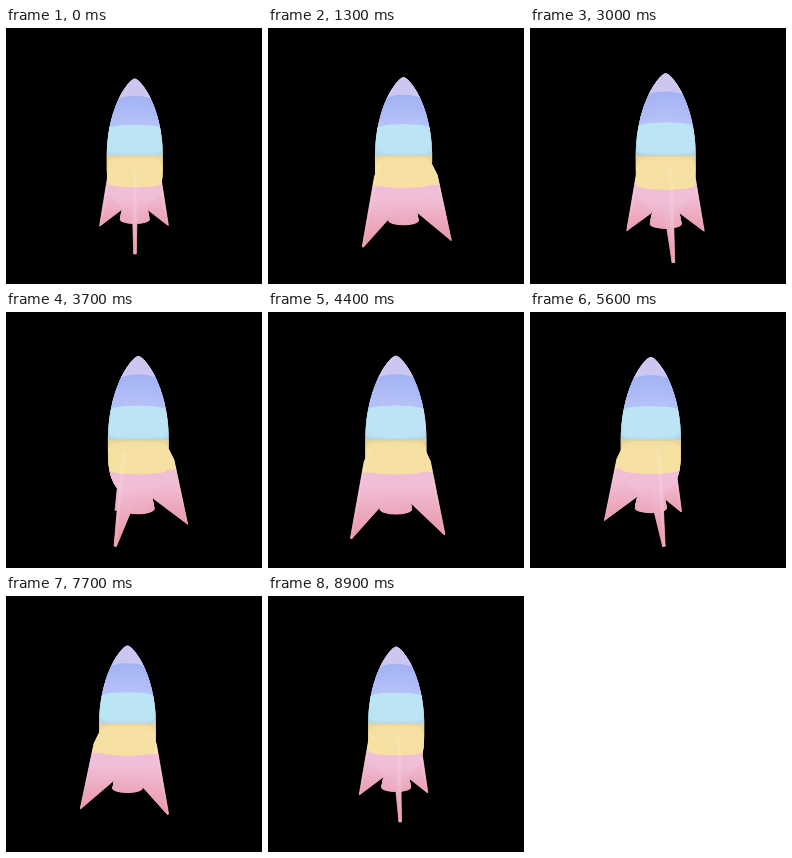
These frames come from a looping animation (256x256 px, 9 s). An HTML page with a canvas:

```html
<!DOCTYPE html>
<html lang="en">
<head>
<meta charset="utf-8">
<title>Pastel rocket</title>
<style>
html, body { margin: 0; width: 100%; height: 100%; overflow: hidden; background: #000; }
canvas { display: block; width: 256px; height: 256px; }
</style>
</head>
<body>
<canvas id="stage" width="256" height="256"></canvas>
<script>
const ctx = document.getElementById('stage').getContext('2d');
const LOOP = 9000, STEP = 100, MID = 128;
const DIST = 215;      // camera distance
const ORBIT = 9.2;     // offset of the rocket from the turning axis
const HALF = 80.7;     // half height
const RADIUS = 29, WAIST = 12, WAIST_Y = 54, TAIL_Y = 66;
const BAND = 28.9;
const FIN_SPAN = 47.2;
const FINS = [0, -125, -238];

const rad = deg => deg * Math.PI / 180;
const mix = (a, b, k) => a + (b - a) * k;
const clamp = k => Math.min(1, Math.max(0, k));

// Heights run down from the middle of the rocket.
function tint(y, light = 0) {
  const band = Math.floor(y / BAND);
  const glow = l => mix(l, 100, light);
  if (band < -2) return `hsl(248 57% ${glow(86)}%)`;
  if (band === -2) return `hsl(229 80% ${glow(mix(84, 80, -y / BAND - 1))}%)`;
  if (band === -1) return `hsl(198 74% ${glow(85)}%)`;
  if (band === 0) return `hsl(44 82% ${glow(80)}%)`;
  const k = clamp((y - 40) / (HALF - 40));
  return `hsl(${mix(331, 349, k)} 64% ${glow(mix(84.5, 76, k))}%)`;
}

function hullRadius(y) {
  if (y < 0) return RADIUS * Math.pow(clamp(1 - (y / HALF) ** 2), 0.72);
  if (y < WAIST_Y) return mix(RADIUS, WAIST, (y / WAIST_Y) ** 4);
  return WAIST + Math.sqrt(y - WAIST_Y);
}

// Outline of a fin as radius and height; the last points follow the hull.
const FIN = [[RADIUS, 9], [34, 19], [FIN_SPAN, HALF],
  ...[WAIST_Y, 42, BAND].map(y => [hullRadius(y), y])];

function project(x, y, z) {
  const s = DIST / (DIST - z);
  return [MID + x * s, MID + y * s];
}

function shape(points, fill) {
  ctx.beginPath();
  points.forEach(p => ctx.lineTo(...p));
  ctx.closePath();
  ctx.fillStyle = ctx.strokeStyle = fill;
  ctx.lineWidth = 0.4;
  ctx.fill();
  ctx.stroke();
}

function ring(cx, cz, y) {
  const r = hullRadius(y), d = DIST - cz;
  const front = y * DIST / (d - r), back = y * DIST / (d + r);
  const x = MID + cx * DIST / d, mid = MID + (front + back) / 2;
  const rx = r * DIST / Math.sqrt(d * d - r * r);
  ctx.fillStyle = tint(y);
  ctx.beginPath();
  ctx.ellipse(x, mid, rx, Math.abs(front - back) / 2, 0, 0, 2 * Math.PI);
  ctx.fill();
  ctx.fillRect(x - rx, mid - 0.4, 2 * rx, 0.8);
}

function hull(cx, cz) {
  for (let y = -HALF; y < 0; y += 0.5) ring(cx, cz, y);
  for (let y = TAIL_Y; y >= 0; y -= 0.5) ring(cx, cz, y);
}

function finTint(s, light) {
  const g = ctx.createLinearGradient(0, MID, 0, MID + HALF * s);
  for (let y = 0; y <= HALF; y++) g.addColorStop(y / HALF, tint(y, light));
  return g;
}

function fin(cx, cz, a) {
  const sx = -Math.sin(a), sz = Math.cos(a);
  const side = k => FIN.map(([r, y]) => {
    const t = k * (1 + 1.8 * (1 - r / FIN_SPAN));
    return project(cx + r * sx + t * sz, y, cz + r * sz - t * sx);
  });
  const left = side(-1), right = side(1);
  const s = DIST / (DIST - cz - RADIUS * sz);
  const face = finTint(s, 0), edge = finTint(s, 0.12);
  shape(left, face);
  shape(right, face);
  // lower, upper and outer rims
  for (const i of [2, 0, 1])
    shape([left[i], left[i + 1], right[i + 1], right[i]], i === 2 ? face : edge);
}

function draw(time) {
  const turn = Math.floor(time % LOOP / STEP) * STEP / LOOP * 360;
  const orbit = rad(turn + 5);
  const cx = ORBIT * Math.sin(orbit), cz = -ORBIT * Math.cos(orbit);
  const angles = FINS.map(f => rad(turn + f)).sort((a, b) => Math.cos(a) - Math.cos(b));
  ctx.fillStyle = '#000';
  ctx.fillRect(0, 0, 256, 256);
  angles.filter(a => Math.cos(a) <= 0).forEach(a => fin(cx, cz, a));
  hull(cx, cz);
  angles.filter(a => Math.cos(a) > 0).forEach(a => fin(cx, cz, a));
}

const start = performance.now();
function tick() {
  draw(performance.now() - start);
  requestAnimationFrame(tick);
}
tick();
</script>
</body>
</html>
```
